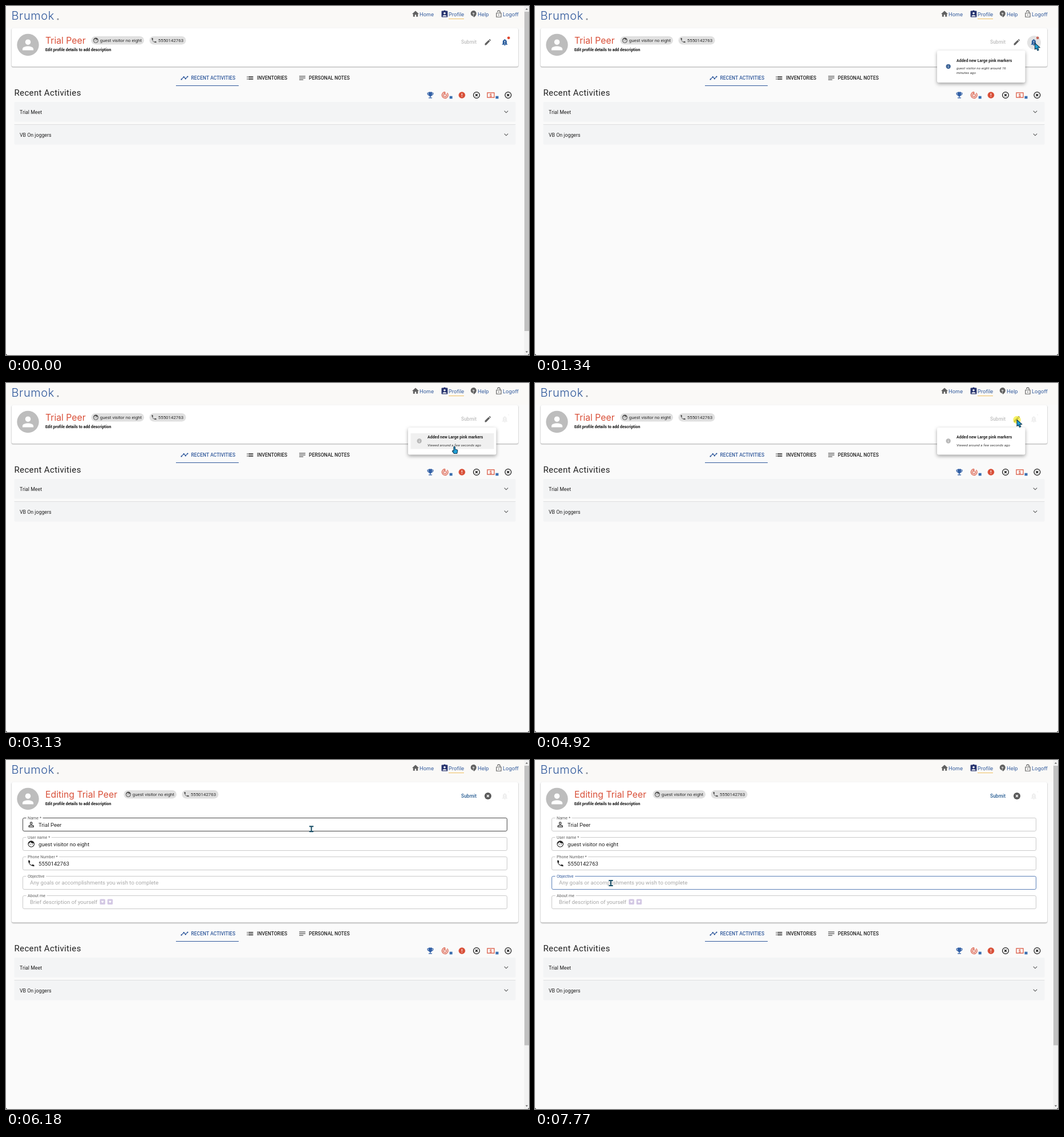
Recreate the animation shown at these times as an HTML page with a canvas. Size 917x611 px, loop 8 s.

```html
<!DOCTYPE html>
<html lang="en">
<head>
<meta charset="utf-8">
<title>Profile page</title>
<style>
  html, body { margin: 0; width: 100%; height: 100%; overflow: hidden; background: #fafafa; }
  canvas { display: block; width: 917px; height: 611px; }
</style>
</head>
<body>
<canvas id="stage"></canvas>
<script>
const W = 917, H = 611, LOOP = 8000;
const canvas = document.getElementById('stage');
const c = canvas.getContext('2d');
const dpr = window.devicePixelRatio || 1;
canvas.width = W * dpr;
canvas.height = H * dpr;

const ROBOTO = 'Roboto, sans-serif', INTER = 'Inter, sans-serif';
const BLUE = '#30599c', RED = '#d9513a', INK = '#212121', GREY = '#616161';
const user = { name: 'Trial Peer', login: 'guest visitor no eight', phone: '5550142763' };

// Moments at which the page changes state
const T = { bellHover: 800, menuOpen: 1060, viewed: 2600, menuClose: 5060, scrollBack: 5320,
            penHover: 5650, edit: 5860, focus: 7310, caretOff: 7770 };
const CLICKS = [[930, 1060], [2470, 2600], [4920, 5060], [5790, 5860], [7240, 7430]];

// Pointer stops: time, x, y of the hot spot
const STOPS = [
  [0, 892, 625], [70, 892, 600], [870, 876.5, 65], [1810, 876.5, 65], [2210, 784, 111],
  [2870, 784, 111], [3130, 786, 111], [3670, 845, 64.5], [5930, 845, 64.5],
  [6450, 192, 183], [6650, 176, 179.5], [7200, 133, 215.5], [8000, 133, 215.5]
];

// Icons on a 24-unit grid
const disc = 'M2 12a10 10 0 1 0 20 0 10 10 0 1 0-20 0z';
const ring = 'M3 12a9 9 0 1 0 18 0 9 9 0 1 0-18 0z';
const cross = 'M8.7 8.7l6.6 6.6M15.3 8.7l-6.6 6.6';
const eye = 'a1.3 1.3 0 1 0 2.6 0 1.3 1.3 0 1 0-2.6 0z';
const ICON = {
  home: 'M10 20v-6h4v6h5v-8h3L12 3 2 12h3v8z',
  badge: 'M4 3h16l1 1v16l-1 1H4l-1-1V4zM12 6.8a3 3 0 1 0 .01 0zM6 19h12c0-5-12-5-12 0zM12 1a3 3 0 0 0-3 2h6a3 3 0 0 0-3-2z',
  help: 'M11.5 2a8.5 8.5 0 1 0 .5 17v3c5-2.4 8-7 8-11.5A8.5 8.5 0 0 0 11.5 2z',
  lock: 'M5 9h14v12H5zM8 6a4 4 0 0 1 8 0v3M12 13v4',
  person: 'M8 8a4 4 0 1 0 8 0 4 4 0 1 0-8 0zM4 20v-2c0-5.3 16-5.3 16 0v2z',
  personLine: 'M9 8a3 3 0 1 0 6 0 3 3 0 1 0-6 0zM5 19v-2c0-4 14-4 14 0v2z',
  face: disc + 'M4 11.1c2.4-1 4.2-3 5.2-5.3 2.5 3.5 6 4.5 10.4 3.9A8 8 0 1 1 4 11.1zM7.7 13' + eye + 'M13.7 13' + eye,
  phone: 'M6.6 10.8c1.4 2.8 3.8 5.1 6.6 6.6l2.2-2.2 5.6 1.3V20q0 1-1 1A17 17 0 0 1 3 4q0-1 1-1h3.5l1.3 5.6z',
  edit: 'M3 17.2V21h3.8L17.8 10 14 6.2zM20.7 7L17 3.3 15.1 5.1l3.8 3.8z',
  bell: 'M18 16v-5c0-3-1.6-5.6-4.5-6.3a1.5 2 0 0 0-3 0C7.6 5.4 6 8 6 11v5l-2 2v1h16v-1zM11 14h2v2h-2zM11 8h2v4h-2zM10 20h4a2 2 0 0 1-4 0z',
  trend: 'M3 16l7-7 5 5 6-6',
  trendDots: 'M3 16h.01M10 9h.01M15 14h.01M21 8h.01',
  list: 'M3 8h2M3 12h2M3 16h2M7 8h14M7 12h14M7 16h14',
  notes: 'M3 7h18M3 12h18M3 17h12',
  trophy: 'M7 3h10v2h4v3a5 5 0 0 1-4.4 5A5 5 0 0 1 13 16v3h4v2H7v-2h4v-3a5 5 0 0 1-3.6-3A5 5 0 0 1 3 8V5h4zM5 7v1a3 3 0 0 0 2 2.8V7zM19 7v1a3 3 0 0 1-2 2.8V7z',
  target: 'M12 3a9 9 0 1 0 6.4 2.6M12 7a5 5 0 1 0 3.5 1.5M12 3v9M11 12h2',
  money: 'M2 5h20v14H2z',
  chevron: 'M6 9l6 6 6-6',
  heart: 'M12 19C2 12 6 5 12 9c6-4 10 3 0 10z',
  bang: 'M12 7v6M12 15v2',
  info: 'M12 11v6M12 7v2',
  disc, cross, closeLine: ring + cross
};
for (const k in ICON) ICON[k] = new Path2D(ICON[k]);
const ARROW = new Path2D('M0 0v11l2.6-2.1 2 4 2.2-1-1.9-3.8 4-.3z');
const HAND = new Path2D('M-1 1q1.2-1.4 2.4 0v4l3.6 1q1.2.5.8 2l-1 4.5H-.5L-3.3 8.6q-.3-1.6 1-1.3L-1 8z');

const clamp = v => Math.max(0, Math.min(1, v));
const ease = v => v * v * (3 - 2 * v);

function text(s, x, y, size, color, { font = ROBOTO, weight = 400, gap = 0, italic = false } = {}) {
  c.font = `${italic ? 'italic ' : ''}${weight} ${size}px ${font}`;
  c.letterSpacing = gap + 'px';
  c.fillStyle = color;
  c.fillText(s, x, y);
}

function rect(x, y, w, h, color, r = 0) {
  c.fillStyle = color;
  c.beginPath();
  c.roundRect(x, y, w, h, r);
  c.fill();
}

function circle(x, y, r, color) {
  c.fillStyle = color;
  c.beginPath();
  c.arc(x, y, r, 0, 7);
  c.fill();
}

// Icon centred on x, y; a line width makes it an outline
function icon(name, x, y, size, color, line = 0, cap = 'butt') {
  c.save();
  c.translate(x - size / 2, y - size / 2);
  c.scale(size / 24, size / 24);
  c.fillStyle = c.strokeStyle = color;
  c.lineWidth = line;
  c.lineCap = cap;
  if (line) c.stroke(ICON[name]);
  else c.fill(ICON[name], 'evenodd');
  c.restore();
}

function panel(x, y, w, h, blur, dy, alpha) {
  c.save();
  c.shadowColor = `rgba(0,0,0,${alpha})`;
  c.shadowBlur = blur * dpr;
  c.shadowOffsetY = dy * dpr;
  rect(x, y, w, h, '#fff', 2.4);
  c.restore();
}

function drawNav() {
  rect(0, 0, W, 38, '#faf9f7');
  text('Brumok', 9.5, 23.6, 20, BLUE, { font: INTER, weight: 300, gap: 0.6 });
  circle(91, 23, 1.6, '#8a8f98');
  const link = (s, x) => text(s, x, 18.4, 9, BLUE, { font: INTER });
  icon('home', 718, 14, 14.4, GREY);
  link('Home', 725);
  icon('badge', 769, 14, 14.4, '#27346f');
  link('Profile', 776);
  rect(776, 22, 27, 1, '#f0c060');
  icon('help', 820, 14, 14.4, GREY);
  text('?', 817.4, 16.6, 8, '#faf9f7', { weight: 700 });
  link('Help', 827);
  icon('lock', 864, 14, 14, GREY, 2);
  link('Logoff', 871);
}

function chip(name, label, x, w) {
  rect(x, 53, w, 14.4, '#e0e0e0', 7.2);
  icon(name, x + 8, 60.2, 11, '#505050');
  text(label, x + 15.3, 63, 7.9, '#2b2b2b');
}

function drawProfile(t) {
  const editing = t >= T.edit, seen = t >= T.viewed;
  panel(10, 39, 888, editing ? 245.5 : 67.2, 2, 0.9, 0.42);
  circle(38.5, 68, 19.2, '#bdbdbd');
  icon('person', 38.5, 68, 28.8, '#fff');
  text((editing ? 'Editing ' : '') + user.name, 69, 66, 15.8, RED, { font: INTER });
  const dx = editing ? 57 : 0;
  chip('face', user.login, 149.5 + dx, 92.5);
  chip('phone', user.phone, 251.5 + dx, 64);
  text('Edit profile details to add description', 69, 79.2, 7, '#111', { weight: 700 });

  text('Submit', 798, 66, 8.5, editing ? '#2a5f94' : '#bfbfbf', { weight: 500 });
  if (t >= T.penHover && !editing) circle(845, 63, 14.4, '#f3f3f3');
  if (editing) {
    icon('disc', 845, 63, 14.4, '#585858');
    icon('cross', 845, 63, 14.4, '#fff', 2.2);
  } else icon('edit', 845, 63, 14.4, GREY);

  if (t >= T.bellHover && !seen) {
    if (t < T.menuOpen) circle(875, 63.5, 14.4, '#f4f4f4');
    else circle(875, 64, 12, '#e3e3e3');
  }
  icon('bell', 874.5, 63.5, 14.4, seen ? '#efefef' : '#2d5f9e');
  circle(881.3, 55.8, seen ? 1 : 2.4, seen ? '#f2f2f2' : t >= T.menuOpen ? '#c4665a' : '#e0452c');
}

function field(i, label, t) {
  const y = Math.round(101.4 + i * 33.8);
  const focused = i === 3 && t >= T.focus;
  const p = pointer(t);
  const hover = p.x < 879 && p.y > y && p.y < y + 24;
  c.strokeStyle = focused ? '#5b80b8' : hover ? '#484848' : '#cacaca';
  c.lineWidth = 1;
  c.beginPath();
  c.roundRect(29.5, y + 0.5, 849, 23, 2.4);
  c.stroke();
  c.font = `400 7.2px ${ROBOTO}`;
  c.letterSpacing = '0px';
  rect(35.5, y - 1, c.measureText(label).width + 5, 3, '#fff');
  text(label, 38, y + 2.5, 7.2, focused && t > T.focus + 70 ? BLUE : '#606060');
  return y;
}

function drawForm(t) {
  const filled = (i, label, value, name, line) => {
    const y = field(i, label, t);
    icon(name, 44.2, y + 12, 14, INK, line);
    text(value, 57, y + 15.6, 9.6, INK);
  };
  filled(0, 'Name *', user.name, 'personLine', 2);
  filled(1, 'User name *', user.login, 'face');
  filled(2, 'Phone Number *', user.phone, 'phone');
  const hint = (s, y) => text(s, 42, y + 15, 9.65, '#a8a8a8');
  let y = field(3, 'Objective', t);
  hint('Any goals or accomplishments you wish to complete', y);
  if (t >= T.focus - 40 && t < T.caretOff) rect(42, y + 6, 1, 11, '#222');
  y = field(4, 'About me', t);
  hint('Brief description of yourself', y - 0.4);
  for (const x of [169.2, 182.5]) {
    rect(x - 4.7, y + 6.5, 9.4, 9.4, '#d3c8e4', 1.5);
    icon('heart', x, y + 11, 8, '#fff');
  }
}

function drawActivities(dy) {
  c.save();
  c.translate(0, dy);
  const tab = (s, x, color) => text(s, x, 128.6, 8.5, color, { weight: 500 });
  icon('trend', 313, 126, 14.4, BLUE, 2);
  icon('trendDots', 313, 126, 14.4, BLUE, 4, 'round');
  tab('RECENT ACTIVITIES', 324.5, BLUE);
  rect(298, 139, 110, 1, BLUE);
  icon('list', 428, 126, 14.4, INK, 2);
  tab('INVENTORIES', 440, INK);
  icon('notes', 519.5, 126, 14.4, INK, 2);
  tab('PERSONAL NOTES', 531, INK);

  text('Recent Activities', 14.5, 156.5, 15, INK, { gap: 0.35 });
  icon('trophy', 744, 156, 14.4, '#315fa5');
  icon('target', 769.7, 156, 14.4, RED, 2);
  rect(777.7, 157.7, 5, 4.6, '#3a6fb0');
  icon('disc', 799.4, 156, 14, RED);
  icon('bang', 799.4, 156, 14, '#fff', 2);
  icon('closeLine', 825, 156, 14.4, '#111', 2);
  icon('money', 850, 156, 14.4, RED, 2);
  text('$', 847.8, 158.6, 7.4, RED, { weight: 700 });
  rect(858.5, 157.7, 5, 4.6, '#3a6fb0');
  icon('closeLine', 880.4, 156, 14.4, '#111', 2);

  ['Trial Meet', 'VB On joggers'].forEach((s, i) => {
    const y = 168 + i * 40;
    rect(14.5, y, 879, 34.5, '#f3f4f5', 1.5);
    if (i) rect(14.5, y - 1, 879, 1, '#dedfe0');
    text(s, 24, y + 21, 8.8, INK);
    icon('chevron', 877, y + 17.2, 13, '#555', 2);
  });
  c.restore();
}

function drawMenu(t) {
  const shown = ease(clamp((t - T.menuOpen) / 240)) * (1 - clamp((t - T.menuClose) / 200));
  if (!shown) return;
  const seen = t >= T.viewed, h = seen ? 47.5 : 56;
  const p = pointer(t);
  c.save();
  c.globalAlpha = shown;
  if (t < T.menuClose) {
    c.translate(859, 78);
    c.scale(0.75 + 0.25 * shown, 0.56 + 0.44 * shown);
    c.translate(-859, -78);
  }
  panel(705, 78, 154.5, h, 6, 2.6, 0.36);
  if (p.x < 855 && p.y > 88) rect(709.5, 88, 146, h - 20, '#f0f0f0');
  const y = seen ? 101.5 : 105.8;
  icon('disc', 724.7, y, 10, seen ? '#b8b8b8' : '#3d6496');
  icon('info', 724.7, y, 10, '#fff', 2);
  text('Added new Large pink markers', 739, seen ? 97 : 97.6, 7, '#222', { weight: 700 });
  const note = (s, y) => text(s, 739, y, 6.2, '#333', { italic: true, gap: 0.08 });
  if (seen) note('Viewed around a few seconds ago', 110.6);
  else {
    note(user.login + ' around 16', 110.6);
    note('minutes ago', 119.2);
  }
  c.restore();
}

function drawScrollbar(t) {
  if (t >= T.menuOpen && t < T.scrollBack) return;
  rect(908.5, 0, 8.5, H, '#f1f1f1');
  rect(909, 10, 8, t >= T.edit ? 489.5 : 559, '#c1c1c1');
  c.fillStyle = '#606060';
  c.beginPath();
  c.moveTo(910.8, 6.5); c.lineTo(913, 4); c.lineTo(915.2, 6.5);
  c.moveTo(910.8, 604.5); c.lineTo(913, 607); c.lineTo(915.2, 604.5);
  c.fill();
}

function pointer(t) {
  const i = Math.max(1, STOPS.findIndex(s => s[0] > t));
  const [t0, x0, y0] = STOPS[i - 1], [t1, x1, y1] = STOPS[i];
  const k = ease(clamp((t - t0) / (t1 - t0)));
  return { x: x0 + (x1 - x0) * k, y: y0 + (y1 - y0) * k };
}

function drawPointer(t) {
  const { x, y } = pointer(t);
  if (CLICKS.some(([a, b]) => t >= a && t < b)) circle(x, y, 6.7, 'rgba(245,238,50,0.75)');
  const inForm = t >= T.edit && x < 879 && y > 101 && y < 261;
  const onBell = t >= T.bellHover && t < T.menuOpen;
  const onItem = t > 1900 && t < 3600 && x < 856 && y > 88;
  const onPen = t >= T.penHover && t < 6000;
  c.save();
  c.translate(x, y);
  if (inForm) {
    c.strokeStyle = '#174d66';
    c.lineWidth = 2;
    c.beginPath();
    c.moveTo(-3.7, -4.5); c.lineTo(3.7, -4.5);
    c.moveTo(0, -4.5); c.lineTo(0, 4.5);
    c.moveTo(-3.7, 4.5); c.lineTo(3.7, 4.5);
    c.stroke();
  } else {
    const shape = onBell || onItem || onPen ? HAND : ARROW;
    c.fillStyle = '#1f9fd6';
    c.strokeStyle = '#12384f';
    c.lineWidth = 1.1;
    c.lineJoin = 'round';
    c.fill(shape);
    c.stroke(shape);
  }
  c.restore();
}

function drawCorners() {
  c.fillStyle = '#000';
  for (const [x, d] of [[0, 1], [W, -1]]) {
    c.beginPath();
    c.moveTo(x, H - 3);
    c.quadraticCurveTo(x, H, x + 3 * d, H);
    c.lineTo(x, H);
    c.fill();
  }
}

function draw(t) {
  c.setTransform(dpr, 0, 0, dpr, 0, 0);
  rect(0, 0, W, H, '#fafafa');
  drawNav();
  drawProfile(t);
  if (t >= T.edit) drawForm(t);
  drawActivities(t >= T.edit ? 178 : 0);
  drawScrollbar(t);
  drawMenu(t);
  drawPointer(t);
  drawCorners();
}

function tick() {
  draw(performance.now() % LOOP);
  requestAnimationFrame(tick);
}
tick();
</script>
</body>
</html>
```
